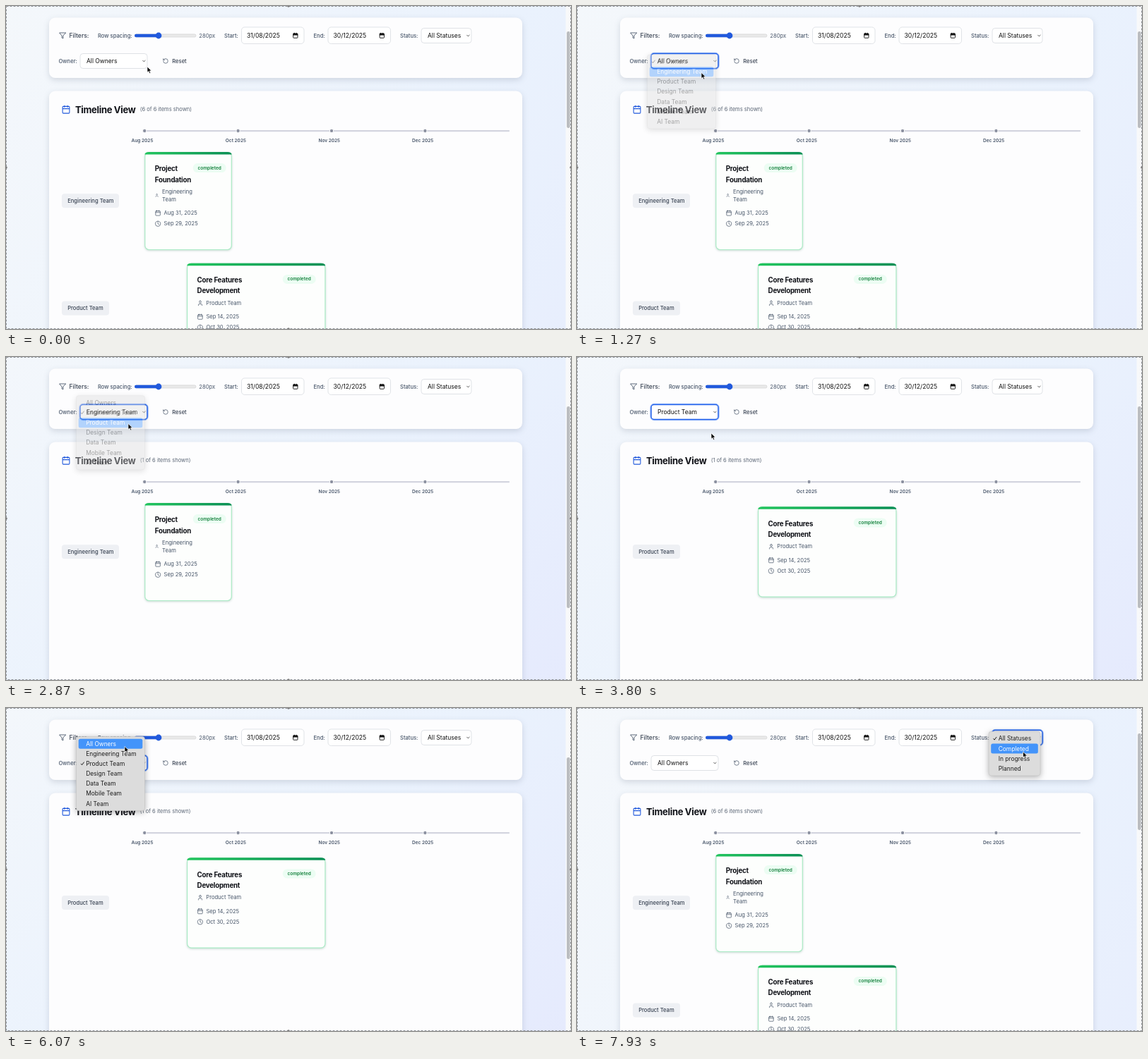
Write an HTML page that moves like this. It is 800 px wide and 458 px high and loops after 8000 ms.

```html
<!DOCTYPE html>
<html lang="en">
<head>
<meta charset="utf-8">
<title>Timeline filters</title>
<style>
html, body { margin: 0; width: 100%; height: 100%; overflow: hidden; }
svg { display: block; width: 100%; height: 100%; }
text { font-family: Inter, "Liberation Sans", sans-serif; dominant-baseline: central; white-space: pre; }
.panel { fill: #fdfdfe; filter: drop-shadow(0 3px 4px rgba(30, 41, 70, .15)); }
.field { fill: #fff; stroke: #d3d7dd; stroke-width: .7; }
.icon { fill: none; stroke: #475569; stroke-width: .9; stroke-linecap: round; stroke-linejoin: round; }
.card { fill: #fdfefd; stroke: #abebc6; stroke-width: 1.2; filter: drop-shadow(0 1.2px 1.6px rgba(20, 90, 60, .22)); }
.menu { fill: #dcdcdc; stroke: #bdbdbd; stroke-width: .5; filter: drop-shadow(0 2px 4px rgba(0, 0, 0, .3)); }
.ring { fill: none; stroke: #2563eb; stroke-width: 1.5; }
.halo { fill: none; stroke: #8fb4fa; stroke-width: 1; }
</style>
</head>
<body>
<svg id="stage" viewBox="0 0 800 458"></svg>
<script>
const LOOP = 8000, ROW = 14.15, FADE = 200;
const owners = ["All Owners", "Engineering Team", "Product Team", "Design Team", "Data Team", "Mobile Team", "AI Team"];
const statuses = ["All Statuses", "Completed", "In progress", "Planned"];

// Open and click times, with the row selected on opening
const menus = [
  { open: 620, click: 1150, items: owners, sel: 0, x: 99.5, w: 97, y: 79 },
  { open: 2320, click: 2750, items: owners, sel: 1, x: 99.5, w: 97, y: 79 },
  { open: 5170, click: 6120, items: owners, sel: 2, x: 99.5, w: 97, y: 79 },
  { open: 7380, click: LOOP, items: statuses, sel: 0, x: 583, w: 73, y: 43.4 }
];
// Time, x, y of the pointer tip
const path = [
  [0, 200, 86], [70, 200, 86], [560, 178, 80], [700, 178, 80], [1080, 176, 94.5],
  [1800, 176, 94.5], [2260, 172, 82], [2400, 172, 82], [2670, 173, 94.5], [2900, 173, 94.5],
  [3400, 190, 108], [3800, 190, 108], [4560, 203, 50.5], [4700, 203, 50.5], [5120, 172, 80],
  [5400, 172, 80], [5900, 168, 54.5], [6330, 168, 54.5], [6870, 339, 62], [7230, 622, 44],
  [7480, 622, 44], [7880, 631.5, 62], [LOOP, 631.5, 62]
];

const text = (s, x, y, size = 7.6, fill = "#475569", weight = 400, extra = "") =>
  `<text x="${x}" y="${y}" font-size="${size}" fill="${fill}" font-weight="${weight}" ${extra}>${s}</text>`;
const rect = (x, y, w, h, r, attrs) => `<rect x="${x}" y="${y}" width="${w}" height="${h}" rx="${r}" ${attrs}/>`;
// Icons are drawn on a 24-unit grid centred on x, y
const icon = (d, x, y, size, color = "#475569", width = 2) =>
  `<path class="icon" d="${d}" transform="translate(${x - size / 2} ${y - size / 2}) scale(${size / 24})"
    style="stroke:${color};stroke-width:${width}"/>`;
const shapes = {
  calendar: "M5 4h14a2 2 0 0 1 2 2v14a2 2 0 0 1-2 2H5a2 2 0 0 1-2-2V6a2 2 0 0 1 2-2zM16 2v4M8 2v4M3 10h18",
  clock: "M12 2a10 10 0 1 0 0 20a10 10 0 1 0 0-20M12 6v6l4 2",
  user: "M19 21v-2a4 4 0 0 0-4-4H9a4 4 0 0 0-4 4v2M12 3a4 4 0 1 0 0 8a4 4 0 1 0 0-8",
  funnel: "M22 3H2l8 9.5V19l4 2v-8.5z",
  reset: "M3 12a9 9 0 1 0 9-9a9.8 9.8 0 0 0-6.7 2.7L3 8M3 3v5h5",
  chevron: "M4 8l8 8l8-8"
};
const tight = 'letter-spacing="-.025em"';

function dateField(x, value) {
  return rect(x, 30, 88.5, 23.5, 4.4, 'class="field"') + text(value, x + 7.5, 42, 8.6, "#111") +
    icon(shapes.calendar, x + 76.3, 41.8, 8.4, "#111", 2.6) +
    rect(x + 73.2, 39, 6.2, 2, 0, 'fill="#111"');
}
function select(id, x, y, w) {
  return rect(x, y, w, 21, 4, 'class="field"') + text("", x + 9, y + 10.5, 8.5, "#111", 400, `id="${id}"`) +
    icon(shapes.chevron, x + w - 4.6, y + 10.6, 5, "#333", 4) +
    `<g id="${id}Ring">` + rect(x - 1.1, y - 1.1, w + 2.2, 23.2, 5, 'class="halo"') +
    rect(x, y, w, 21, 4, 'class="ring"') + "</g>";
}
function card(x, y, w, h, title, badgeX, owner, dates) {
  const left = x + 14, two = owner.length > 1, last = y + h - 52;
  return rect(x, y, w, h, 6, 'class="card"') +
    `<path fill="url(#bar)" d="M${x - .4} ${y + 3}q.5-3.6 6-3.6h${w - 11.2}q5.5 0 6 3.6z"/>` +
    title.map((s, i) => text(s, left, y + 23.2 + i * 15.4, 9.75, "#0f1117", 700, tight)).join("") +
    rect(badgeX - 23.5, y + 15.6, 47, 13, 6.5, 'fill="#ecfdf3"') +
    text("completed", badgeX, y + 22.1, 6.5, "#15803d", 600, 'text-anchor="middle"') +
    icon(shapes.user, left + (two ? 2.8 : 4.4), y + (two ? 61 : 56), two ? 5.5 : 8.7) +
    owner.map((s, i) => text(s, left + (two ? 10.3 : 12.7), y + 56 + i * 10.8)).join("") +
    dates.map((s, i) => icon(i ? shapes.clock : shapes.calendar, left + 4.3, last + i * 15.3, 8.7) +
      text(s, left + 12.8, last + i * 15.3)).join("");
}
const label = (s, y, w) => rect(79, y - 10, w, 20, 4, 'fill="#eef0f4"') + text(s, 87.2, y, 7.6, "#374151", 500);

const filters = rect(61, 16.5, 670, 85.5, 8.7, 'class="panel"') +
  icon(shapes.funnel, 80, 42, 10.6) + text("Filters:", 89.5, 42, 8.6, "#374151", 500) +
  [["Row spacing:", 130, 42], ["Start:", 309, 42], ["End:", 435.5, 42], ["Status:", 558, 42], ["Owner:", 74.5, 78]]
    .map(([s, x, y]) => text(s, x, y, 7.6, "#475569", 500)).join("") +
  rect(182.3, 39.9, 86.7, 4.2, 2.1, 'fill="#e9e9e9" stroke="#c4c4c4" stroke-width=".5"') +
  rect(182, 39.7, 34, 4.6, 2.3, 'fill="#2159dc"') + '<circle cx="216" cy="42" r="4.4" fill="#2159dc"/>' +
  text("280px", 273.3, 42) + dateField(333.5, "31/08/2025") + dateField(456, "30/12/2025") +
  select("status", 588, 31.5, 71) + select("owner", 105, 67.5, 95) +
  icon(shapes.reset, 226, 78, 8.7) + text("Reset", 235.3, 78, 7.6, "#374151", 500);

const timeline = rect(61, 120.5, 670, 380, 8.7, 'class="panel"') +
  icon(shapes.calendar, 85, 146.7, 13, "#2159dc") +
  text("Timeline View", 98, 147, 13, "#0f1117", 700, tight) + text("", 189.7, 146.8, 7.55, "#5b6675", 400, 'id="count"') +
  rect(196, 176, 517, 2.2, 1, 'fill="#d3d5df"') +
  ["Aug", "Oct", "Nov", "Dec"].map((m, i) => {
    const x = 196.2 + i * 132.4;
    return `<circle cx="${x}" cy="177" r="2.7" fill="#8b90a0" stroke="#fff" stroke-width="1"/>` +
      text(m + " 2025", x - 3.2, 191.3, 6.5, "#475569", 600, 'text-anchor="middle"');
  }).join("") +
  '<g id="first">' + label("Engineering Team", 276.2, 81) +
  card(196.8, 207.5, 122.5, 138, ["Project", "Foundation"], 288.2, ["Engineering", "Team"], ["Aug 31, 2025", "Sep 29, 2025"]) + "</g>" +
  '<g id="second">' + label("Product Team", 428.6, 67) +
  card(256.6, 365.3, 195.3, 127.3, ["Core Features", "Development"], 415.2, ["Product Team"], ["Sep 14, 2025", "Oct 30, 2025"]) + "</g>";

const frame = rect(.5, .5, 799, 457, 0, 'fill="none" stroke="#8c9096" stroke-width="1" stroke-dasharray="3 2"') +
  [[400, 0], [0, 229], [400, 458], [800, 229]].map(([x, y]) => `<circle cx="${x}" cy="${y}" r="1.8" fill="#777"/>`).join("");

const $ = id => document.getElementById(id);
$("stage").innerHTML =
  `<defs><linearGradient id="bar"><stop stop-color="#22c55e"/><stop offset="1" stop-color="#0b8f55"/></linearGradient></defs>` +
  filters + timeline + rect(792.5, 0, 7.5, 458, 0, 'fill="#f8f9fa"') +
  rect(794, 36, 4.6, 137, 2.3, 'id="thumb" fill="#bbbdc0"') + frame + '<g id="menu"></g>' +
  `<path id="pointer" d="M0 0v8.2l1.9-1.7l1.3 3l1.5-.6l-1.3-3h2.6z" fill="#000" stroke="#fff" stroke-width=".7"/>`;

function pointerAt(t) {
  const i = path.findIndex(p => p[0] > t), [t0, x0, y0] = path[i - 1], [t1, x1, y1] = path[i];
  const k = (t - t0) / (t1 - t0), e = k * k * (3 - 2 * k);
  return [x0 + (x1 - x0) * e, y0 + (y1 - y0) * e];
}

function drawMenu(t, py) {
  const m = menus.find(m => t >= m.open && t < m.click + FADE);
  if (!m) return "";
  const top = m.y - 10.1 - ROW * m.sel;
  const hover = Math.floor((py - top - 3) / ROW);
  const alpha = Math.min(1, 1 - (t - m.click) / FADE);
  return `<g opacity="${alpha}">` + rect(m.x, top, m.w, m.items.length * ROW + 6, 3.5, 'class="menu"') +
    m.items.map((s, i) => {
      const y = top + 10.1 + i * ROW, on = i === hover, color = on ? "#fff" : "#1c1c1c";
      return (on ? rect(m.x + 3.2, y - 7, m.w - 6.4, 14, 2.5, 'fill="#4394fa"') : "") +
        text(s, m.x + 13.7, y, 8.4, color) +
        (i === m.sel ? icon("M4 13l5 6L20 4", m.x + 8.8, y, 6, color, 4) : "");
    }).join("") + "</g>";
}

const show = (id, on) => $(id).setAttribute("visibility", on ? "visible" : "hidden");
let shown = -1;
function applyFilter(choice) {
  if (choice === shown) return;
  shown = choice;
  const all = choice === 0, height = all ? 1530 : 733;
  $("owner").textContent = owners[choice];
  $("count").textContent = `(${all ? 6 : 1} of 6 items shown)`;
  show("first", choice < 2);
  show("second", choice !== 1);
  $("second").setAttribute("transform", `translate(0 ${all ? 0 : -152.5})`);
  $("thumb").setAttribute("y", all ? 36 : 70);
  $("thumb").setAttribute("height", all ? 137 : 286);
  document.body.style.background =
    `linear-gradient(to bottom right, #f5f8fb, #eaf2fd 50%, #e4e8fd) 0 ${all ? -120 : -112}px / 793px ${height}px`;
}

function draw(now) {
  const t = now % LOOP, [x, y] = pointerAt(t);
  applyFilter(t < 1330 ? 0 : t < 2930 ? 1 : t < 6300 ? 2 : 0);
  show("ownerRing", t >= 620 && t < 7380);
  show("statusRing", t >= 7380);
  $("menu").innerHTML = drawMenu(t, y);
  $("pointer").setAttribute("transform", `translate(${x} ${y})`);
}

$("status").textContent = statuses[0];
const start = performance.now();
function tick() {
  draw(performance.now() - start);
  requestAnimationFrame(tick);
}
tick();
</script>
</body>
</html>
```
